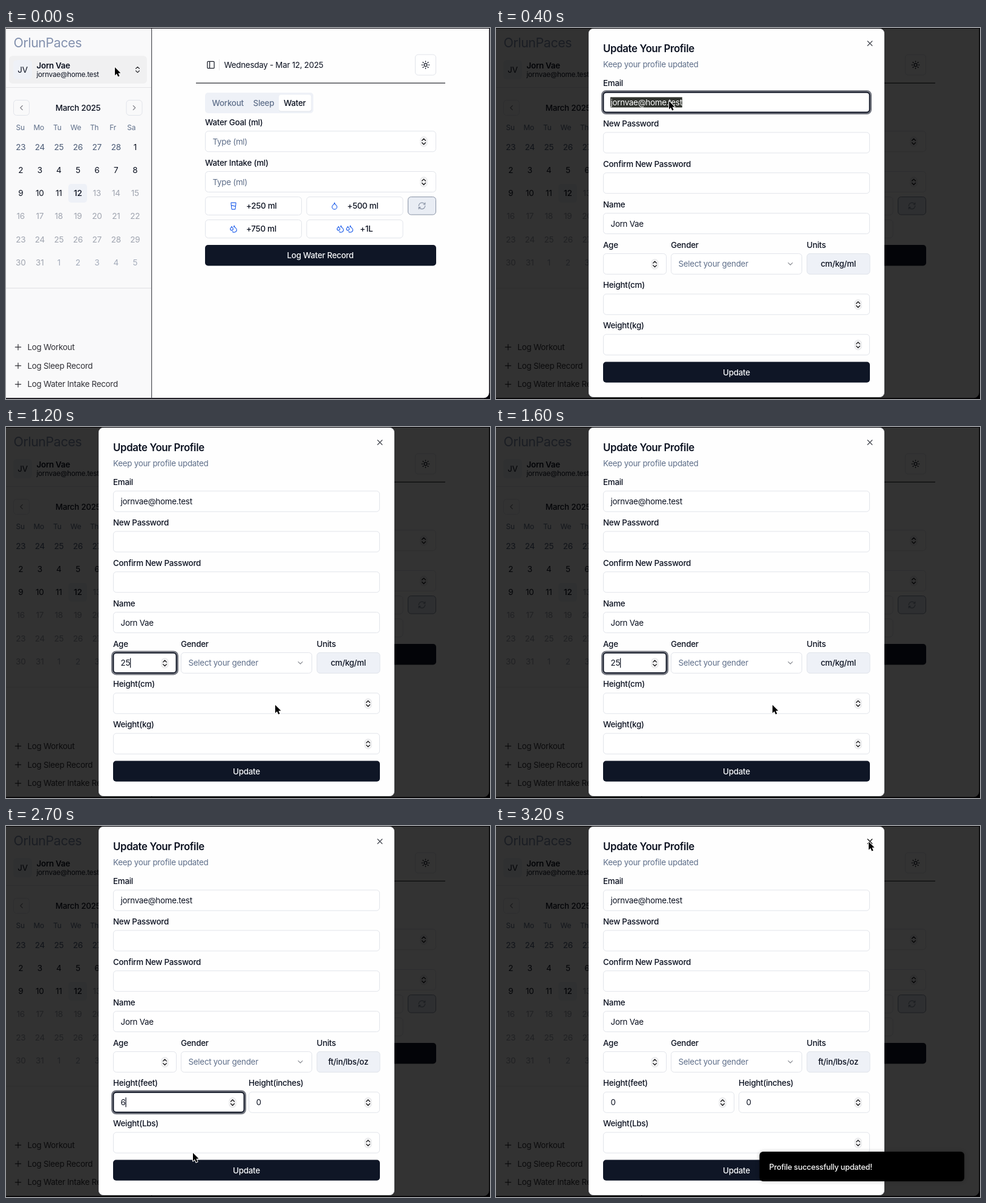
An HTML page with a canvas for the animation above (3.3 s loop, 800 by 614 pixels).

```html
<!DOCTYPE html>
<html lang="en">
<head>
<meta charset="utf-8">
<title>Profile update</title>
<style>
html, body { margin: 0; width: 100%; height: 100%; overflow: hidden; background: #09070f; }
canvas { display: block; width: 800px; height: 614px; }
</style>
</head>
<body>
<canvas id="stage" width="800" height="614"></canvas>
<script>
const ctx = document.getElementById('stage').getContext('2d');
const LOOP = 3300, STEP = 100;
const APP = 'OrlunPaces', USER = 'Jorn Vae', INITIALS = 'JV', MAIL = 'jornvae@home.test';
const INK = '#0b1120', NAVY = '#0f1626', SLATE = '#5f6f8a', LINE = '#e1e4ea', PALE = '#eef1f7', BLUE = '#2563eb';

const ICONS = {
  glass: 'M5.1 4.1A1 1 0 0 1 6.1 3h11.8a1 1 0 0 1 1 1.1L17.2 20.2A2 2 0 0 1 15.2 22H8.8a2 2 0 0 1-2-1.8zM6 12a5 5 0 0 1 6 0 5 5 0 0 0 6 0',
  drop: 'M12 22a7 7 0 0 0 7-7c0-2-1-3.9-3-5.5s-3.5-4-4-6.5c-.5 2.5-2 4.9-4 6.5C6 11.1 5 13 5 15a7 7 0 0 0 7 7z',
  drops: 'M7 16.3c2.2 0 4-1.8 4-4 0-1.2-.6-2.3-1.7-3.2S7.3 6.8 7 5.3c-.3 1.4-1.1 2.8-2.3 3.8S3 11.1 3 12.3c0 2.2 1.8 4 4 4zM12.6 6.6A11 11 0 0 0 14 3c.5 2.5 2 4.9 4 6.5s3 3.5 3 5.5a7 7 0 0 1-11.9 5',
  refresh: 'M3 12a9 9 0 0 1 9-9 9.8 9.8 0 0 1 6.7 2.7L21 8M21 3v5h-5M21 12a9 9 0 0 1-9 9 9.8 9.8 0 0 1-6.7-2.7L3 16M8 16H3v5',
  panel: 'M5 3h14a2 2 0 0 1 2 2v14a2 2 0 0 1-2 2H5a2 2 0 0 1-2-2V5a2 2 0 0 1 2-2zM9 3v18',
  sun: 'M16 12a4 4 0 1 1-8 0 4 4 0 1 1 8 0M12 2v2M12 20v2M4.9 4.9l1.4 1.4M17.7 17.7l1.4 1.4M2 12h2M20 12h2M6.3 17.7l-1.4 1.4M19.1 4.9l-1.4 1.4',
  updown: 'M7 15l5 5 5-5M7 9l5-5 5 5',
  left: 'M15 18l-6-6 6-6',
  right: 'M9 18l6-6-6-6',
  down: 'M6 9l6 6 6-6',
  plus: 'M4 12h16M12 4v16',
  close: 'M18 6L6 18M6 6l12 12'
};
for (const k in ICONS) ICONS[k] = new Path2D(ICONS[k]);
const ARROW = new Path2D('M0 0V13.4L3 10.6 5.2 15.6 7.6 14.6 5.4 9.7 9.5 9.5z');

function icon(name, x, y, color, size = 14, weight = 2) {
  ctx.save();
  ctx.translate(x - size / 2, y - size / 2);
  ctx.scale(size / 24, size / 24);
  ctx.lineWidth = weight;
  ctx.lineCap = ctx.lineJoin = 'round';
  ctx.strokeStyle = color;
  ctx.stroke(ICONS[name]);
  ctx.restore();
}

// y is the middle of the capitals
function text(str, x, y, { size = 13.4, weight = 400, color = INK, align = 'left' } = {}) {
  ctx.font = `${weight} ${size}px Inter, "Open Sans", sans-serif`;
  ctx.letterSpacing = `${-0.02 * size}px`;
  ctx.textAlign = align;
  ctx.fillStyle = color;
  ctx.fillText(str, x, y + size * 0.36);
  return ctx.measureText(str).width;
}

function box(x, y, w, h, fill, stroke, r = 5, lw = 1) {
  ctx.beginPath();
  ctx.roundRect(x, y, w, h, r);
  if (fill) { ctx.fillStyle = fill; ctx.fill(); }
  if (stroke) { ctx.strokeStyle = stroke; ctx.lineWidth = lw; ctx.stroke(); }
}

function bar(x, y, w, h, color) {
  ctx.fillStyle = color;
  ctx.fillRect(x, y, w, h);
}

function spinner(x, y) {
  box(x - 5.5, y - 8, 11, 16, '#f3f3f4', '#dcdde0', 5, 0.8);
  icon('updown', x, y, '#1b1b1d', 14, 2.3);
}

function sidebar(hover) {
  bar(0, 1, 240, 611, '#f9f9fa');
  text(APP, 12.5, 24, { size: 21.4, color: '#8391ae' });
  if (hover) box(5, 46, 228, 46, '#f0f0f1', null, 6);
  box(12, 53, 31, 32, PALE, null, 6);
  text(INITIALS, 27.5, 69, { align: 'center' });
  text(USER, 50.5, 62, { weight: 600 });
  text(MAIL, 50.5, 77, { size: 11.7 });
  icon('updown', 217.5, 69, '#26262a', 14);
  bar(0, 98, 240, 1, '#e4e4e7');
  bar(0, 430, 240, 1, '#e0e0e3');
  calendar();
  ['Log Workout', 'Log Sleep Record', 'Log Water Intake Record'].forEach((label, i) => {
    const y = 528.2 + i * 30.7;
    icon('plus', 20, y, '#303036', 14, 2);
    text(label, 35.5, y, { color: '#303036' });
  });
}

function calendar() {
  box(12.5, 119.5, 26, 25, null, LINE);
  box(199, 119.5, 26, 25, null, LINE);
  icon('left', 25.5, 132, '#85858c', 14);
  icon('right', 212, 132, '#85858c', 14);
  text('March 2025', 119, 132, { weight: 500, align: 'center' });
  ['Su', 'Mo', 'Tu', 'We', 'Th', 'Fr', 'Sa'].forEach((d, i) =>
    text(d, 23.6 + i * 30.6, 165, { size: 11.9, color: SLATE, align: 'center' }));
  box(103, 258, 31, 31, PALE);
  for (let i = 0; i < 42; i++) {
    const day = i < 6 ? 23 + i : i < 37 ? i - 5 : i - 36;
    const color = i < 6 ? '#4b5b76' : i <= 17 ? INK : i < 37 ? '#a0a5b0' : '#a3abba';
    text(String(day), 24.3 + (i % 7) * 31.5, 197 + Math.floor(i / 7) * 38.2,
      { size: 13.6, color, align: 'center', weight: i === 17 ? 500 : 400 });
  }
}

function amount(x, y, icons, label, labelX) {
  box(x + 0.5, y + 0.5, 159, 30, '#fff', LINE);
  icons.forEach(([name, ix]) => icon(name, ix, y + 15.3, BLUE));
  text(label, labelX, y + 15.2, { weight: 500 });
}

function mainPane() {
  icon('panel', 338.5, 61, '#1b1f2a', 15);
  bar(352, 52, 1, 18, '#e4e4e7');
  text('Wednesday - Mar 12, 2025', 360.5, 61);
  box(676.5, 44, 34, 34, '#fff', LINE);
  icon('sun', 693.5, 61, INK, 15);
  bar(314, 90.5, 412, 1.3, '#34363c');

  box(329, 107, 179, 34, PALE);
  box(451, 111, 54, 27.5, '#dfe3ea', null, 4);
  box(451, 110.5, 53.5, 27, '#fff', null, 4);
  text('Workout', 340.5, 124.5, { weight: 500, color: SLATE });
  text('Sleep', 408.5, 124.5, { weight: 500, color: SLATE });
  text('Water', 459, 124.5, { weight: 500 });

  ['Water Goal (ml)', 'Water Intake (ml)'].forEach((label, i) => {
    const y = 156 + i * 66.8;
    text(label, 329, y, { weight: 500 });
    box(329.5, y + 14.7, 381, 34, '#fff', LINE);
    text('Type (ml)', 341.5, y + 32, { color: SLATE });
    spinner(690.5, y + 32);
  });

  amount(329, 279, [['glass', 376]], '+250 ml', 397);
  amount(496.5, 279, [['drop', 543]], '+500 ml', 564);
  amount(329, 317, [['drops', 376]], '+750 ml', 397);
  amount(496.5, 317, [['drops', 552.5], ['drops', 568]], '+1L', 585);
  box(664.5, 279.5, 46, 29.5, '#e9edf4', '#8993a5');
  icon('refresh', 687.5, 294.3, '#8a94a6', 14);
  box(329, 359, 382, 34.5, NAVY);
  text('Log Water Record', 519.5, 376.5, { weight: 500, color: '#f8fafc', align: 'center' });
}

const rowY = i => 106 + i * 66.85;

function field(x, w, row, { label, value = '', focus, select, spin }) {
  const y = rowY(row), mid = y + 17.2;
  text(label, x, y - 14.6, { weight: 500 });
  if (focus) {
    box(x - 1, y - 1, w + 2, 36, null, '#747780', 6, 4);
    box(x + 0.5, y + 0.5, w - 1, 33, '#fff', '#0d1322', 5, 1.8);
  } else {
    box(x + 0.5, y, w - 1, 34, '#fff', LINE);
  }
  let width = 0;
  if (select) {
    ctx.font = '400 13.4px Inter, "Open Sans", sans-serif';
    ctx.letterSpacing = '-0.268px';
    bar(x + 12, y + 8.5, ctx.measureText(value).width + 0.5, 17, '#31342f');
  }
  if (value) width = text(value, x + 12.5, mid, { color: select ? '#fff' : INK });
  if (focus && !select) bar(x + 12.5 + width, y + 9, 1.2, 16, INK);
  if (spin) spinner(x + w - 19.5, mid + 0.3);
}

function dialog(s) {
  const feet = s >= 19;
  box(153.5, 1.5, 488, 609, '#fefefe', '#e6e8ed', 7);
  text('Update Your Profile', 177, 34, { size: 16.8, weight: 600 });
  text('Keep your profile updated', 177, 60, { color: SLATE });
  icon('close', 618, 25.5, s === 32 ? '#111' : '#4a4d55', 15, 2);

  field(177, 441, 0, { label: 'Email', value: MAIL, focus: s < 10, select: s < 10 });
  field(177, 441, 1, { label: 'New Password' });
  field(177, 441, 2, { label: 'Confirm New Password' });
  field(177, 441, 3, { label: 'Name', value: USER });

  const age = s < 11 || feet ? '' : s < 12 ? '2' : '25';
  field(177, 105, 4, { label: 'Age', value: age, focus: s >= 10 && s < 18, spin: true });
  field(289, 217, 4, { label: 'Gender' });
  text('Select your gender', 301.5, rowY(4) + 17.2, { color: SLATE });
  icon('down', 486.5, rowY(4) + 17, '#85888f', 14);
  text('Units', 513.5, rowY(4) - 14.6, { weight: 500 });
  box(514, rowY(4), 104, 34, PALE, '#dfe3ea');
  text(feet ? 'ft/in/lbs/oz' : 'cm/kg/ml', 565.7, rowY(4) + 17.2, { weight: 500, align: 'center' });

  if (feet) {
    field(177, 217, 5, { label: 'Height(feet)', value: s >= 24 && s < 31 ? '6' : '0', focus: s >= 21 && s < 28, spin: true });
    field(401, 217, 5, { label: 'Height(inches)', value: '0', spin: true });
  } else {
    field(177, 441, 5, { label: 'Height(cm)', spin: true });
  }
  field(177, 441, 6, { label: feet ? 'Weight(Lbs)' : 'Weight(kg)', spin: true });
  box(177, 552.5, 441, 34.3, s >= 28 && s < 31 ? '#232a39' : NAVY);
  text('Update', 397.5, 569.8, { weight: 500, color: '#f8fafc', align: 'center' });
}

function toast(rise) {
  const y = 539 + (1 - rise) * 50;
  ctx.save();
  ctx.globalAlpha = rise;
  ctx.shadowColor = 'rgba(0,0,0,.25)';
  ctx.shadowBlur = 6;
  box(435.5, y, 338.5, 49, '#000', null, 6);
  ctx.restore();
  ctx.save();
  ctx.globalAlpha = rise;
  text('Profile successfully updated!', 451.5, y + 25, { size: 12.8, weight: 500, color: '#fafafa' });
  ctx.restore();
}

// step, x, y
const PATH = [
  [0, 180, 65], [1, 180, 65], [3, 286, 121], [6, 286, 121], [7, 276, 185], [8, 248, 325],
  [9, 235, 385], [10, 235, 385], [11, 330, 566], [12, 445, 460], [13, 457, 460], [16, 457, 460],
  [17, 525, 418], [18, 572, 391], [19, 500, 415], [20, 272, 456], [21, 272, 456], [22, 185, 520],
  [23, 118, 551], [24, 215, 550], [27, 309, 541], [28, 396, 563], [29, 398, 563],
  [30, 515, 389], [31, 602, 80], [32, 616, 26]
];
const CLICKS = [1, 3, 9, 18, 20, 28];

function pointer(s) {
  const i = Math.max(1, PATH.findIndex(p => p[0] >= s));
  const [s0, x0, y0] = PATH[i - 1], [s1, x1, y1] = PATH[i];
  const k = (s - s0) / (s1 - s0);
  const x = x0 + (x1 - x0) * k, y = y0 + (y1 - y0) * k;
  if (CLICKS.includes(s)) {
    ctx.beginPath();
    ctx.arc(x, y, 20.5, 0, Math.PI * 2);
    ctx.strokeStyle = '#111';
    ctx.lineWidth = 1.5;
    ctx.stroke();
  }
  ctx.save();
  ctx.translate(x, y);
  ctx.lineJoin = 'round';
  ctx.lineWidth = 2;
  ctx.strokeStyle = '#fff';
  ctx.stroke(ARROW);
  ctx.fillStyle = '#000';
  ctx.fill(ARROW);
  ctx.restore();
}

function draw(s) {
  bar(0, 0, 800, 614, '#09070f');
  ctx.save();
  ctx.beginPath();
  ctx.roundRect(0, 1, 798.5, 611.3, [0, 0, 9, 0]);
  ctx.clip();
  bar(0, 0, 800, 614, '#fefefe');
  sidebar(s < 3);
  bar(240, 0, 1.3, 614, '#55575c');
  mainPane();
  ctx.restore();

  if (s >= 3) {
    ctx.save();
    ctx.globalAlpha = s === 3 ? 0.5 : 1;
    bar(0, 0, 800, 614, 'rgba(0,0,0,' + (s === 3 ? 0.4 : 0.8) + ')');
    dialog(s);
    ctx.restore();
  }
  if (s >= 29) toast(s === 29 ? 0.5 : 1);
  pointer(s);
}

let last = -1;
function tick(now) {
  const s = Math.floor((now % LOOP) / STEP);
  if (s !== last) draw(last = s);
  requestAnimationFrame(tick);
}
draw(0);
requestAnimationFrame(tick);
</script>
</body>
</html>
```
